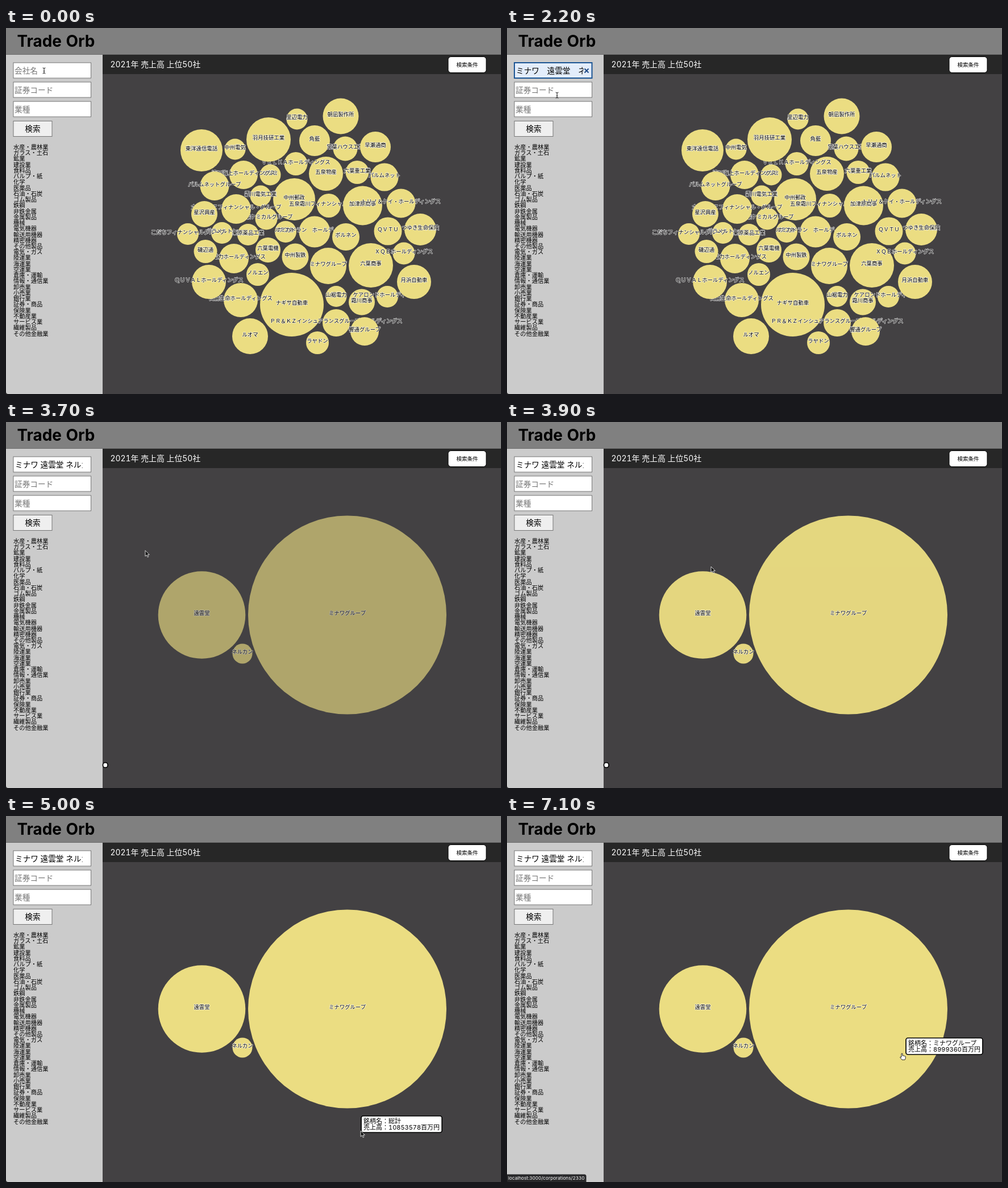
Animation, 871 px wide and 643 px high, one loop 7.2 s. Source, as an HTML page:

```html
<!DOCTYPE html>
<html lang="ja">
<head>
<meta charset="utf-8">
<title>Trade Orb</title>
<style>
  html, body { margin: 0; width: 100%; height: 100%; overflow: hidden; background: #434143; }
  svg { display: block; width: 871px; height: 643px; font-family: Inter, "Noto Sans CJK JP", "Noto Sans CJK", sans-serif; }
  text { white-space: pre; font-variant-numeric: tabular-nums; }
  .label { font-size: 9.4px; text-anchor: middle; fill: #000; stroke: #fff; stroke-opacity: .85;
           stroke-width: 1.5px; stroke-linejoin: round; paint-order: stroke; }
</style>
</head>
<body>
<svg id="stage" viewBox="0 0 871 643"></svg>
<script>
const LOOP = 7200;
const RELOAD = 3500;
const stage = document.getElementById('stage');

function add(parent, tag, attrs, content) {
  const el = document.createElementNS('http://www.w3.org/2000/svg', tag);
  for (const k in attrs) el.setAttribute(k, attrs[k]);
  if (content !== undefined) el.textContent = content;
  parent.appendChild(el);
  return el;
}
const group = parent => add(parent, 'g', {});
const rect = (p, x, y, width, height, fill, more) => add(p, 'rect', { x, y, width, height, fill, ...more });
const text = (p, x, y, size, fill, str, more) => add(p, 'text', { x, y, 'font-size': size, fill, ...more }, str);
const show = (el, on) => el.setAttribute('display', on ? 'inline' : 'none');

// Page frame
rect(stage, 170, 46, 701, 597, '#434143');
rect(stage, 0, 0, 871, 47, '#808080');
rect(stage, 0, 46, 871, 1, '#6c6c6c');
rect(stage, 0, 47, 170, 596, '#cbcbcb');
rect(stage, 170, 47, 701, 34, '#272727');
text(stage, 19.5, 33, 27.9, '#000', 'Trade Orb', { 'font-weight': 700 });
text(stage, 183.5, 69.3, 13.9, '#fff', '2021年 売上高 上位50社');
rect(stage, 778, 50.5, 67, 28, '#fff', { rx: 5, stroke: '#000' });
text(stage, 811.5, 67.5, 9.5, '#000', '検索条件', { 'text-anchor': 'middle' });

// Search form
const fieldY = [61, 95, 129];
const fields = fieldY.map(y => rect(stage, 13, y, 136.5, 27, '#fff', { stroke: '#767676' }));
const [namePrompt] = ['会社名', '証券コード', '業種'].map((s, i) =>
  text(stage, 15, fieldY[i] + 18.5, 13.65, '#757575', s));
const clip = add(add(stage, 'defs', {}), 'clipPath', { id: 'field' });
rect(clip, 14, 60, 120.5, 28, '#000');
const query = text(stage, 16, 79.6, 13.65, '#000', '', { 'clip-path': 'url(#field)' });
const caret = rect(stage, 15, 67, 1, 15, '#000');
const clear = add(stage, 'path', { d: 'M136.5 71.5l7 7m0-7l-7 7', stroke: '#1d4a86', 'stroke-width': 2 });
const button = rect(stage, 13, 163.5, 68, 27, '#efefef', { stroke: '#767676' });
text(stage, 47, 182, 13.65, '#000', '検索', { 'text-anchor': 'middle' });

const sectors = ('水産・農林業 ガラス・土石 鉱業 建設業 食料品 パルプ・紙 化学 医薬品 石油・石炭 ゴム製品 鉄鋼 ' +
  '非鉄金属 金属製品 機械 電気機器 輸送用機器 精密機器 その他製品 電気・ガス 陸運業 海運業 空運業 倉庫・運輸 ' +
  '情報・通信業 卸売業 小売業 銀行業 証券・商品 保険業 不動産業 サービス業 繊維製品 その他金融業').split(' ');
sectors.forEach((s, i) => text(stage, 13, 212.9 + i * 10.24, 10.24, '#000', s, { 'font-weight': 500 }));

// Bubbles: later ones cover the labels of earlier ones
const back = [
  [503, 486, 56, 'ナギサ自動車'], [642, 417, 39, '六葉商事'], [344, 215, 37, '東洋遠信電話'],
  [507, 301, 37, '中州郵政'], [567, 418, 32, 'ミナワグループ'], [589, 155, 31.5, '朝凪製作所'],
  [563, 256, 30, '五泉物産'], [429.5, 541.5, 31.5, 'ルオマ'], [543, 198, 27, '角藍'],
  [729, 354, 28, 'つゆき生命保険'], [672, 357, 24.5, 'ＱＶＴＵ'], [413, 478, 30, '白鷺生命ホールディングス'],
  [492, 358, 19, 'サワネ'], [543, 358, 27.5, 'ルミカドラン　ホールディングス'],
  [448, 295, 18.5, '霜川電気工業'], [458, 335, 19.5, '六葉ケミカルグループ'],
  [405, 318, 26, '六葉ＱＸＺフィナンシャル・グループ'], [568, 312, 21, '五泉霜川フィナンシャルグループ'],
  [380, 360, 19, 'グラメルトン'], [320, 362, 19, 'こだちフィナンシャルグループ'],
  [465, 258, 18.5, 'ツヅミ'], [418, 258, 25, '湊川海上ホールディングス'],
  [461, 390, 22, '六葉電機'], [401, 405, 26, '葉山電力ホールディングス'],
  [510, 238.5, 20.5, 'ＶＥＬＫＡホールディングス'], [509, 402, 23.5, '中州製鉄'],
  [618, 253.5, 20.5, '六葉重工業'], [443, 433, 20, 'ノルエン'], [581, 471.5, 18.5, '山裾電力'],
  [512, 160, 18.5, '里辺電力'], [626, 481.5, 23, '霜川商事'], [671, 472, 19, 'ケアロンドホールディングス'],
  [581, 518, 24, 'ＰＲ＆ＫＺインシュアランスグループホールディングス'],
  [548, 553, 20, 'ラヤドン'], [597, 212, 21.5, '常葉ハウス工業'], [403, 213, 18.5, '中州電気'],
  [666, 262, 24.5, 'パルムネット']
];
const front = [
  [462, 196, 39, '羽月技研工業'], [367, 277.5, 25.5, 'パルムネットグループ'], [349, 327, 23, '星沢興産'],
  [627.5, 312, 34.5, '加津原商事'], [695, 308, 25.5, 'トリノ＆ケイ・ホールディングス'],
  [598, 367, 24, 'ボルネン'], [351, 392.5, 20.5, '磯辺通'], [357, 446, 30, 'ＱＵＶＡＬホールディングス'],
  [631, 533, 25, '響通グループ'], [718, 446, 30, '月浜自動車'], [650, 209, 27, '早瀬通商'],
  [426, 363, 19, '栗原薬品工業'], [700, 396, 19.5, 'ＸＱＥホールディングス']
];
const found = [
  [600.5, 339, 174.5, 'ミナワグループ', 8999360],
  [344.5, 339, 76.8, '遠雲堂', 1758910],
  [416, 407, 17.5, 'ネルカン', 95308]
];
const total = found.reduce((sum, f) => sum + f[4], 0);

function bubbles(list) {
  const g = group(stage);
  for (const [cx, cy, r, name] of list) {
    add(g, 'circle', { cx, cy, r, fill: '#ebdd82' });
    add(g, 'text', { x: cx, y: cy, class: 'label' }, name);
  }
  return g;
}
const topFifty = bubbles(back.concat(front));
const results = bubbles(found);

// Suggestion popup
const popup = group(stage);
add(popup, 'path', { d: 'M74 96l8-7 8 7z', fill: '#2c2c2e' });
rect(popup, 67, 94.5, 122.5, 30, '#2c2c2e', { rx: 3, stroke: '#232325' });
text(popup, 75, 112.4, 8.3, '#f2f2f2', 'ミナワ　遠雲堂　ネルカン');

// Tooltip and status line
const tip = group(stage);
const tipBox = rect(tip, 1, 1, 9, 9, '#fff', { rx: 3.5, stroke: '#000', 'stroke-width': 1.7 });
const tipName = text(tip, 5, 14.3, 11, '#000', '');
const tipSales = text(tip, 5, 25.2, 11, '#000', '');
const status = group(stage);
add(status, 'path', { d: 'M0 629.5H136q3.5 0 3.5 3.5V643H0z', fill: '#29292b' });
text(status, 2, 639.4, 8.2, '#fff', 'localhost:3000/corporations/2330');
add(stage, 'path', { d: 'M0 639v4h4q-4 0-4-4z', fill: '#222' });

// Pointers, each with its hot spot at 0,0
const pointers = {
  arrow: add(stage, 'path', { d: 'M0 0V10.2L2.4 8 4.1 11.8 5.8 11 4.1 7.4H7.3Z', fill: '#111', stroke: '#fff', 'stroke-width': .8 }),
  hand: add(stage, 'path', {
    d: 'M-1 0.6Q0-.6 1 .6V4.2Q2 3.6 2.8 4.4 3.9 3.9 4.6 4.8 6 4.5 6.2 6V8.5Q6 10 5 11.3H0Q-1.5 9.4-3.4 7 -3.4 5.5-1 6.8Z',
    fill: '#fff', stroke: '#111', 'stroke-width': .9 }),
  beam: add(stage, 'path', { d: 'M-2.4-5Q0-5 0-3.5 0-5 2.4-5M0-4V4M-2.4 5Q0 5 0 3.5 0 5 2.4 5M-1.2.8H1.2', fill: 'none', stroke: '#222', 'stroke-width': 1 })
};

const path = [
  [0, 67, 75], [1050, 67, 75], [1450, 94, 108], [2100, 94, 108], [2800, 53, 178], [3450, 53, 178],
  [3850, 359, 254], [4000, 359, 254], [4800, 610, 546], [4880, 618, 554], [5000, 624, 553],
  [5200, 638, 560], [5480, 655, 535], [5980, 680, 471], [6100, 686, 455], [6280, 695, 417], [LOOP, 695, 417]
];

function pointerAt(t) {
  const i = path.findIndex(k => k[0] > t);
  const [t0, x0, y0] = path[i - 1], [t1, x1, y1] = path[i];
  const p = (t - t0) / (t1 - t0);
  return [x0 + (x1 - x0) * p, y0 + (y1 - y0) * p];
}

const inside = (x, y, top) => x > 13 && x < 149 && y > top && y < top + 27;

function draw(t) {
  const focused = t >= 900 && t < RELOAD;
  const filled = t >= 1900;
  const loaded = t >= RELOAD;
  const open = t >= 1000 && t < 1900;
  const [x, y] = pointerAt(t);

  fields[0].setAttribute('fill', filled && !loaded ? '#e3edfb' : '#fff');
  fields[0].setAttribute('stroke', focused ? '#1b5594' : '#767676');
  fields[0].setAttribute('stroke-width', focused ? 2 : 1);
  show(namePrompt, !filled);
  show(caret, focused && !filled);
  show(clear, filled && !loaded);
  query.textContent = filled ? ['ミナワ', '遠雲堂', 'ネルカン'].join(loaded ? ' ' : '　') : '';
  show(popup, open);

  const onButton = x < 81 && inside(x, y, 163);
  button.setAttribute('fill', onButton ? '#dedede' : '#efefef');

  show(topFifty, !loaded);
  show(results, loaded);
  const rest = Math.max(0, 1 - (t - RELOAD) / 500);
  results.setAttribute('opacity', 1 - rest * rest);

  const hit = loaded && found.find(([cx, cy, r]) => Math.hypot(x - cx, y - cy) < r);
  const onField = !open && fieldY.some(top => inside(x, y, top));
  const kind = hit || onButton ? 'hand' : onField || t < 1150 ? 'beam' : 'arrow';
  for (const k in pointers) show(pointers[k], k === kind);
  pointers[kind].setAttribute('transform', `translate(${x} ${y})`);

  show(tip, loaded);
  const live = t >= 4000;
  tipName.textContent = live ? '銘柄名：' + (hit ? hit[3] : '総計') : '';
  tipSales.textContent = live ? `売上高：${hit ? hit[4] : total}百万円` : '';
  const w = live ? Math.max(tipName.getComputedTextLength(), tipSales.getComputedTextLength()) + 8 : 8.5;
  tipBox.setAttribute('width', w);
  tipBox.setAttribute('height', live ? 29 : 8.5);
  const [lagX, lagY] = pointerAt(Math.max(0, t - 120));
  tip.setAttribute('transform', live ? `translate(${lagX + 6} ${lagY - 28})` : 'translate(169.5 597.5)');

  status.setAttribute('opacity', Math.min(1, Math.max(0, (t - 6350) / 200)));
}

const start = performance.now();
function tick() {
  draw((performance.now() - start) % LOOP);
  requestAnimationFrame(tick);
}
tick();
</script>
</body>
</html>
```
